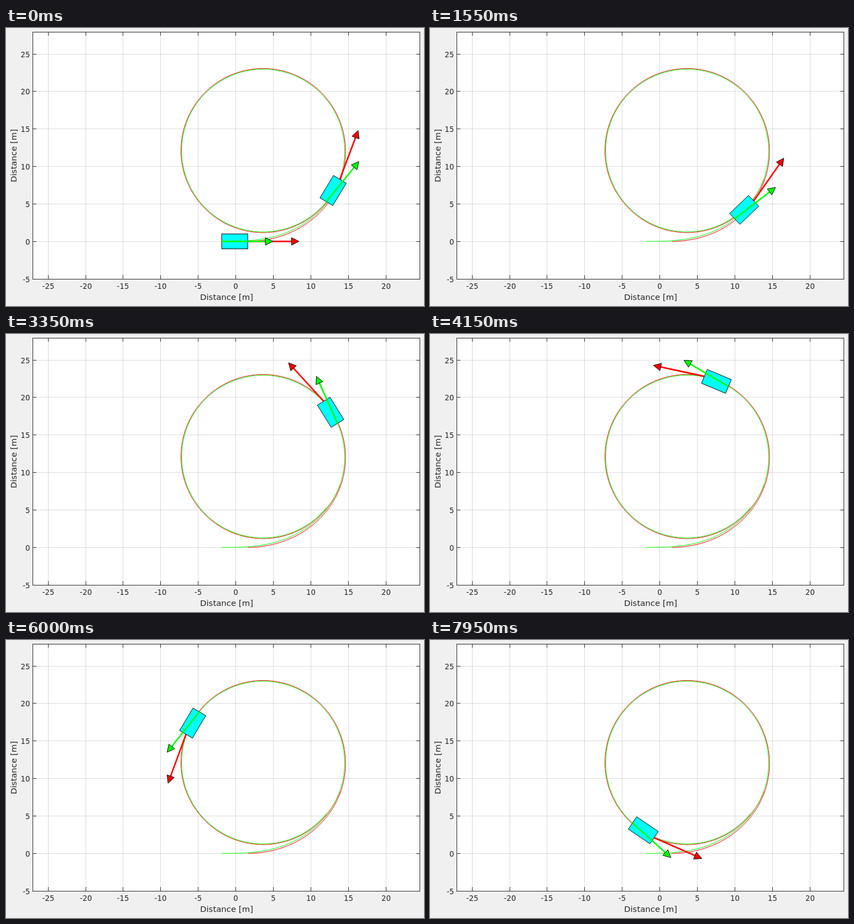
Animation of 756 by 503 pixels, one loop 8 s. Source, as an HTML page:

```html
<!DOCTYPE html>
<html lang="en">
<head>
<meta charset="utf-8">
<title>Vehicle turning circle</title>
<style>
  html, body { margin: 0; width: 100%; height: 100%; overflow: hidden; background: #f0f0f0; }
  svg { display: block; width: 756px; height: 503px; }
  text { font-family: "DejaVu Sans", sans-serif; fill: #262626; }
  .tick { font-size: 13.33px; }
  .label { font-size: 14.9px; text-anchor: middle; }
</style>
</head>
<body>
<svg viewBox="0 0 756 503">
  <rect width="756" height="503" fill="#f0f0f0"/>
  <rect x="48.5" y="7.5" width="700" height="447" fill="#fff"/>
  <path id="grid" stroke="#262626" stroke-opacity=".17" fill="none"/>
  <path id="ticks" stroke="#262626" fill="none"/>
  <rect x="48.5" y="7.5" width="700" height="447" fill="none" stroke="#262626"/>
  <g id="numbers" class="tick"></g>
  <text class="label" x="399" y="492">Distance [m]</text>
  <text class="label" transform="translate(19 231) rotate(-90)">Distance [m]</text>
  <path id="frontTrace" fill="none" stroke="#f00"/>
  <path id="rearTrace" fill="none" stroke="#0f0"/>
  <g id="cars"></g>
</svg>
<script>
const $ = id => document.getElementById(id);
const STEP = 0.05, END = 10, LOOP = 8000;

// Axes
const px = v => Math.floor(415.6 + 13.58 * v) + 0.5;
const py = v => Math.floor(386.3 - 13.57 * v) + 0.5;
let grid = '', ticks = '', numbers = '';
for (let v = -25; v <= 20; v += 5) {
  const x = px(v);
  grid += `M${x} 8V454`;
  ticks += `M${x} 454v-7M${x} 8v6`;
  numbers += `<text x="${x}" y="472" text-anchor="middle">${v}</text>`;
}
for (let v = -5; v <= 25; v += 5) {
  const y = py(v);
  if (v > -5) grid += `M49 ${y}H748`;
  ticks += `M49 ${y}h6M748 ${y}h-6`;
  numbers += `<text x="43.5" y="${y + 5}" text-anchor="end">${v}</text>`;
}
$('grid').setAttribute('d', grid);
$('ticks').setAttribute('d', ticks);
$('numbers').innerHTML = numbers;

// Vehicle response to a steering step, in pixels and seconds
const SPEED = 112.9, YAW_RATE = 0.774, LAG = 0.555, BASE = 47.3, HALF = 13.5;
const SLIP = 7.8 * Math.PI / 180;

function attitude(t) {
  const s = t / LAG, decay = Math.exp(-s);
  const heading = YAW_RATE * (t - LAG * (1 - decay));
  const rear = -SLIP * (1 - (1 + s) * decay);
  const front = Math.atan(BASE * YAW_RATE * (1 - decay) / SPEED + Math.tan(rear));
  return { heading, rear, front };
}

const along = ([x, y], angle, d) => [x + d * Math.cos(angle), y - d * Math.sin(angle)];

// Poses at every step, integrated from the rear axle
const poses = [];
const SUB = 10, dt = STEP / SUB;
let rearAt = [390, 386.1];
for (let i = 0; i <= Math.round(END / STEP); i++) {
  const a = attitude(i * STEP);
  poses.push({ ...a, rearAt, frontAt: along(rearAt, a.heading, BASE) });
  for (let k = 0; k < SUB; k++) {
    const m = attitude(i * STEP + (k + 0.5) * dt);
    rearAt = along(rearAt, m.heading + m.rear, SPEED / Math.cos(m.rear) * dt);
  }
}

const list = pts => pts.map(p => p.map(n => n.toFixed(2)).join(' ')).join('L');
$('rearTrace').setAttribute('d', 'M' + list(poses.map(p => p.rearAt)));
$('frontTrace').setAttribute('d', 'M' + list(poses.map(p => p.frontAt)));

function arrow(from, heading, slip, color) {
  const angle = heading + slip, length = 92.6 / Math.cos(slip);
  const tip = along(from, angle, length);
  const neck = along(from, angle, length - 13.5);
  const side = d => along(neck, angle + Math.PI / 2, d);
  return `<path d="M${list([from, neck])}" stroke="${color}" stroke-width="2.7"/>` +
    `<path d="M${list([tip, side(6.8), side(-6.8)])}Z" fill="${color}" stroke="#000"/>`;
}

function car({ heading, rear, front, rearAt, frontAt }) {
  const side = (p, d) => along(p, heading + Math.PI / 2, d);
  const body = [side(rearAt, HALF), side(frontAt, HALF), side(frontAt, -HALF), side(rearAt, -HALF)];
  return `<path d="M${list(body)}Z" fill="#0ff" stroke="#000"/>` +
    arrow(frontAt, heading, front, '#f00') +
    arrow(rearAt, heading, rear, '#0f0');
}

let shown = -1;
function draw(ms) {
  const n = Math.floor(ms / 50);
  if (n === shown) return;
  shown = n;
  // The first picture shows the start and the end of the run together
  const visible = n === 0 ? [poses[0], poses[poses.length - 1]] : [poses[n - 1]];
  $('cars').innerHTML = visible.map(car).join('');
}

draw(0);
let start;
function tick(now) {
  start ??= now;
  draw((now - start) % LOOP);
  requestAnimationFrame(tick);
}
requestAnimationFrame(tick);
</script>
</body>
</html>
```
